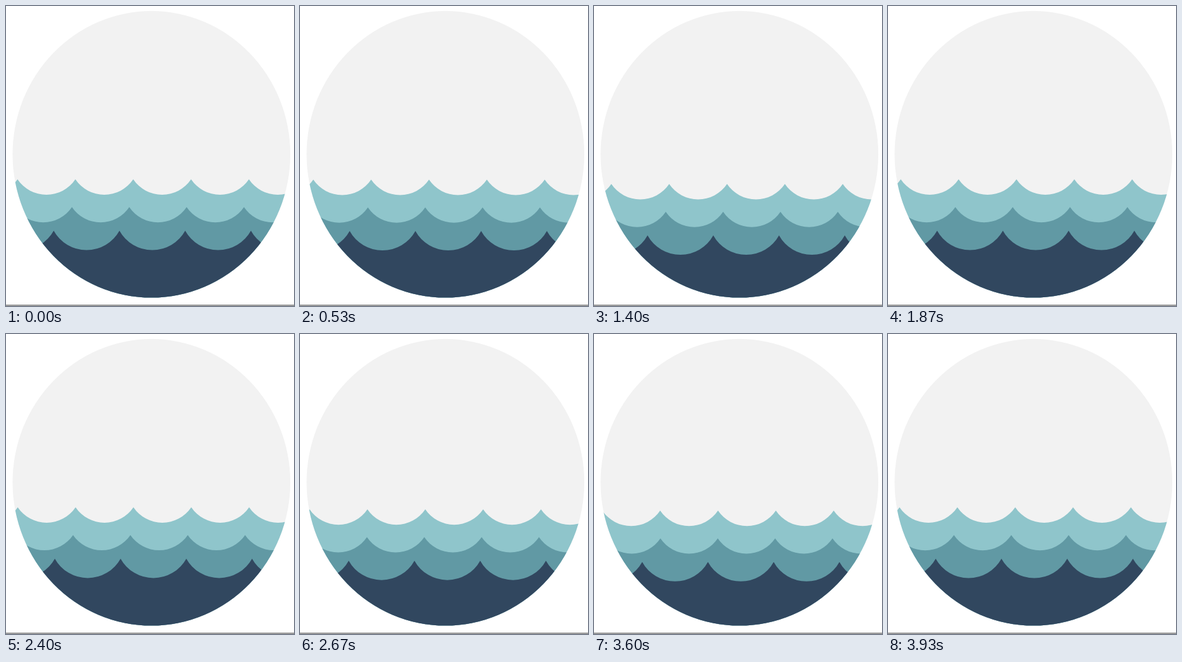
Animation, 460 px wide and 480 px high, one loop 4070 ms. Source, as an HTML page:

```html
<!DOCTYPE html>
<html lang="en">
<head>
<meta charset="utf-8">
<title>Waves</title>
<style>
  html, body { margin: 0; width: 100%; height: 100%; overflow: hidden; background: #fff; }
  svg { display: block; width: 460px; height: 480px; }
</style>
</head>
<body>
<svg viewBox="0 0 460 480">
  <clipPath id="disc"><ellipse cx="232.3" cy="237.3" rx="221.8" ry="229.3"/></clipPath>
  <g clip-path="url(#disc)">
    <rect width="460" height="480" fill="#f2f2f2"/>
    <path id="back" fill="#8fc5cb"/>
    <path id="mid" fill="#6199a4"/>
    <path id="front" fill="#31475f"/>
  </g>
  <rect y="478" width="460" height="1.4" fill="#666"/>
</svg>
<script>
const LOOP = 4070, STEP = 1000 / 15;
const linear = u => u;
const slowDown = u => 1 - (1 - u) ** 1.5;
const speedUp = u => u ** 1.6;

// time, x of the back wave, x of the other two, y of all, easing towards this key
const keys = [
  [0, 0, 0, 0, linear],
  [510, 2.4, 2.7, 0, linear],
  [1130, 10.3, 10.3, 8.5, slowDown],
  [1230, 10.3, 10.3, 8.5, linear],
  [1890, 1.5, 1.8, -0.5, speedUp],
  [2030, 1.5, 1.8, -0.5, linear],
  [2500, 0, 1.8, 0, linear],
  [3130, -8.4, 1.3, 8.6, slowDown],
  [3190, -8.4, 1.3, 8.6, linear],
  [3930, 0, 0, 0, speedUp],
  [LOOP, 0, 0, 0, linear]
];

// A row of circular troughs of the given width and depth, hanging between crests
function shape(id, x, y, width, depth) {
  const r = (width * width / 4 + depth * depth) / (2 * depth);
  const trough = `a${r} ${r} 0 0 0 ${width} 0`;
  const path = document.getElementById(id);
  path.setAttribute("d", `M${x - 2 * width} ${y}${trough.repeat(8)}V700H${x - 2 * width}Z`);
  return path;
}

const back = shape("back", 110.8, 277.3, 92.4, 24.7);
const mid = shape("mid", 105.3, 321.8, 91.6, 24.4);
const front = shape("front", 76.2, 359.5, 105, 31);

function pose(t) {
  const i = keys.findIndex(k => k[0] > t);
  const a = keys[i - 1], b = keys[i];
  const e = b[4]((t - a[0]) / (b[0] - a[0]));
  return [1, 2, 3].map(n => a[n] + (b[n] - a[n]) * e);
}

function draw(now) {
  const t = Math.floor((now % LOOP + 4) / STEP) * STEP;
  const [backX, x, y] = pose(t);
  const move = (path, dx) => path.setAttribute("transform", `translate(${dx} ${y})`);
  move(back, backX);
  move(mid, x);
  move(front, x);
}

let start;
function tick(now) {
  start ??= now;
  draw(now - start);
  requestAnimationFrame(tick);
}
draw(0);
requestAnimationFrame(tick);
</script>
</body>
</html>
```
